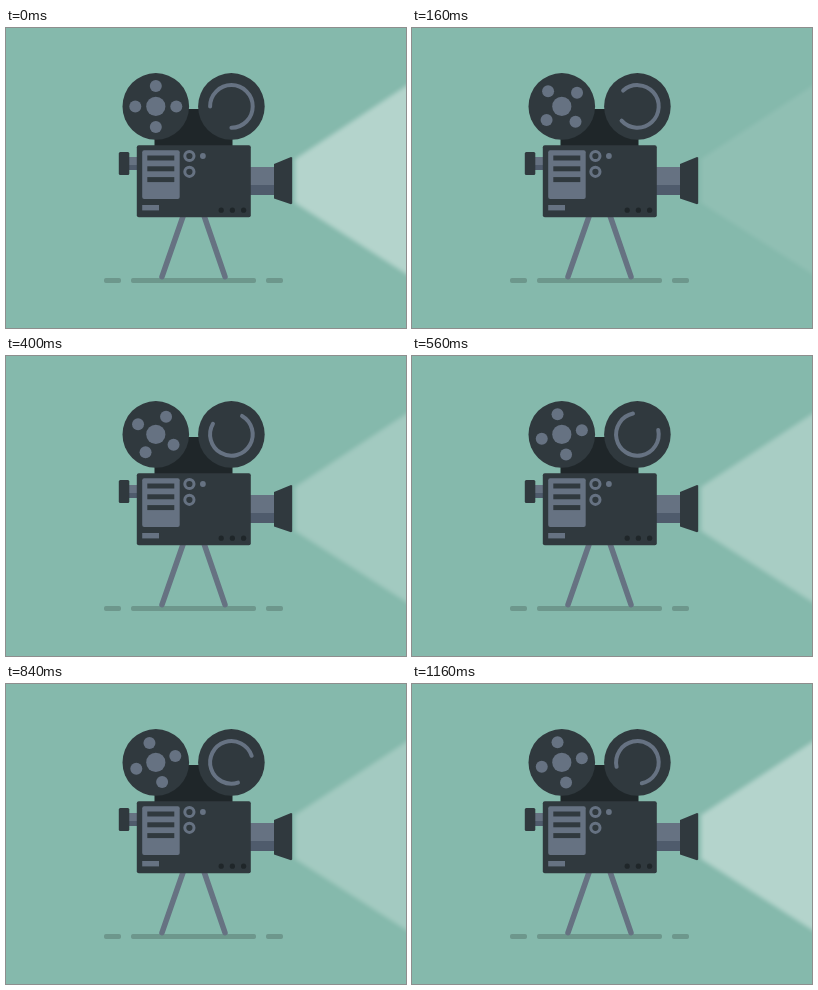
These frames come from a looping animation (400x300 px, 1200 ms). An HTML page with a canvas:

```html
<!DOCTYPE html>
<html lang="en">
<head>
<meta charset="utf-8">
<title>Film projector</title>
<style>
  html, body { margin: 0; width: 100%; height: 100%; overflow: hidden; background: #85b9ac; }
  canvas { display: block; width: 400px; height: 300px; }
</style>
</head>
<body>
<canvas id="stage" width="400" height="300"></canvas>
<script>
const ctx = document.getElementById('stage').getContext('2d');
const LOOP = 1200, STEP = 40, TAU = Math.PI * 2;
const BG = '#85b9ac', DARK = '#30393e', DEEP = '#1f2629', GREY = '#667282', SHADE = '#4f5b6c', GROUND = '#6d978c';

// Lamp flicker: [time in ms, opacity]
const FLICKER = [[0, .39], [120, .04], [240, .2], [560, .29], [720, .065], [840, .25], [1120, .39], [1200, .39]];

function lamp(t) {
  const i = FLICKER.findIndex(k => k[0] > t);
  const [t0, a] = FLICKER[i - 1], [t1, b] = FLICKER[i];
  return a + (b - a) * (t - t0) / (t1 - t0);
}

function box(x, y, w, h, color, r = 0) {
  ctx.fillStyle = color;
  ctx.beginPath();
  ctx.roundRect(x, y, w, h, r);
  ctx.fill();
}

function disc(x, y, r, color) {
  ctx.fillStyle = color;
  ctx.beginPath();
  ctx.arc(x, y, r, 0, TAU);
  ctx.fill();
}

function arc(x, y, r, width, from = 0, to = TAU) {
  ctx.strokeStyle = GREY;
  ctx.lineWidth = width;
  ctx.beginPath();
  ctx.arc(x, y, r, from, to);
  ctx.stroke();
}

function poly(points, color) {
  ctx.fillStyle = color;
  ctx.beginPath();
  points.forEach(([x, y]) => ctx.lineTo(x, y));
  ctx.closePath();
  ctx.fill();
}

function leg(x0, x1) {
  ctx.strokeStyle = GREY;
  ctx.lineWidth = 5.5;
  ctx.beginPath();
  ctx.moveTo(x0, 187);
  ctx.lineTo(x1, 248.7);
  ctx.stroke();
}

function beam(alpha) {
  ctx.save();
  ctx.globalAlpha = alpha;
  ctx.filter = 'blur(2px)';
  poly([[289, 131], [430, 38.3], [430, 265.2], [289, 175]], '#fff');
  ctx.restore();
}

function stand() {
  box(98, 250, 17, 5, GROUND, 2);
  box(125, 250, 125, 5, GROUND, 2);
  box(260, 250, 17, 5, GROUND, 2);
  leg(177.5, 156);
  leg(197.8, 219);
}

function reels(angle) {
  box(148.5, 81, 78, 38, DEEP);
  disc(149.8, 78.4, 33.3, DARK);
  disc(225.4, 78.4, 33.3, DARK);
  disc(149.8, 78.4, 9.6, GREY);
  for (let i = 0; i < 4; i++) {
    const a = angle + i * TAU / 4;
    disc(149.8 + 20.5 * Math.cos(a), 78.4 + 20.5 * Math.sin(a), 6, GREY);
  }
  arc(225.4, 78.4, 21.3, 4, angle + Math.PI, angle + Math.PI * 2.5);
}

function camera() {
  box(122, 129, 10, 13, GREY);
  box(122, 137, 10, 5, SHADE);
  box(112.8, 124, 10.5, 23, DARK, 1.5);
  box(244, 139, 25, 28, GREY);
  box(244, 157, 25, 10, SHADE);
  poly([[268, 136], [285, 129], [286.2, 129.6], [286.2, 175.6], [285, 176.2], [268, 170.5]], DARK);
  box(130.8, 117.3, 114, 72, DARK, 2);

  box(136.2, 122.3, 37.5, 48.7, GREY, 2);
  for (let i = 0; i < 3; i++) {
    box(141.3, 127.5 + i * 10.8, 27, 5, DARK);
    disc(215.2 + i * 11.2, 182.2, 2.6, DEEP);
  }
  box(136.2, 177, 16.8, 5.4, GREY);
  arc(183.4, 128, 4.6, 3);
  arc(183.4, 143.8, 4.6, 3);
  disc(196.9, 128, 2.9, GREY);
}

function draw() {
  const t = Math.floor((performance.now() + 1) / STEP) * STEP % LOOP;
  ctx.lineCap = 'round';
  ctx.fillStyle = BG;
  ctx.fillRect(0, 0, 400, 300);
  beam(lamp(t));
  stand();
  reels(t / LOOP * TAU);
  camera();
  requestAnimationFrame(draw);
}

draw();
</script>
</body>
</html>
```
